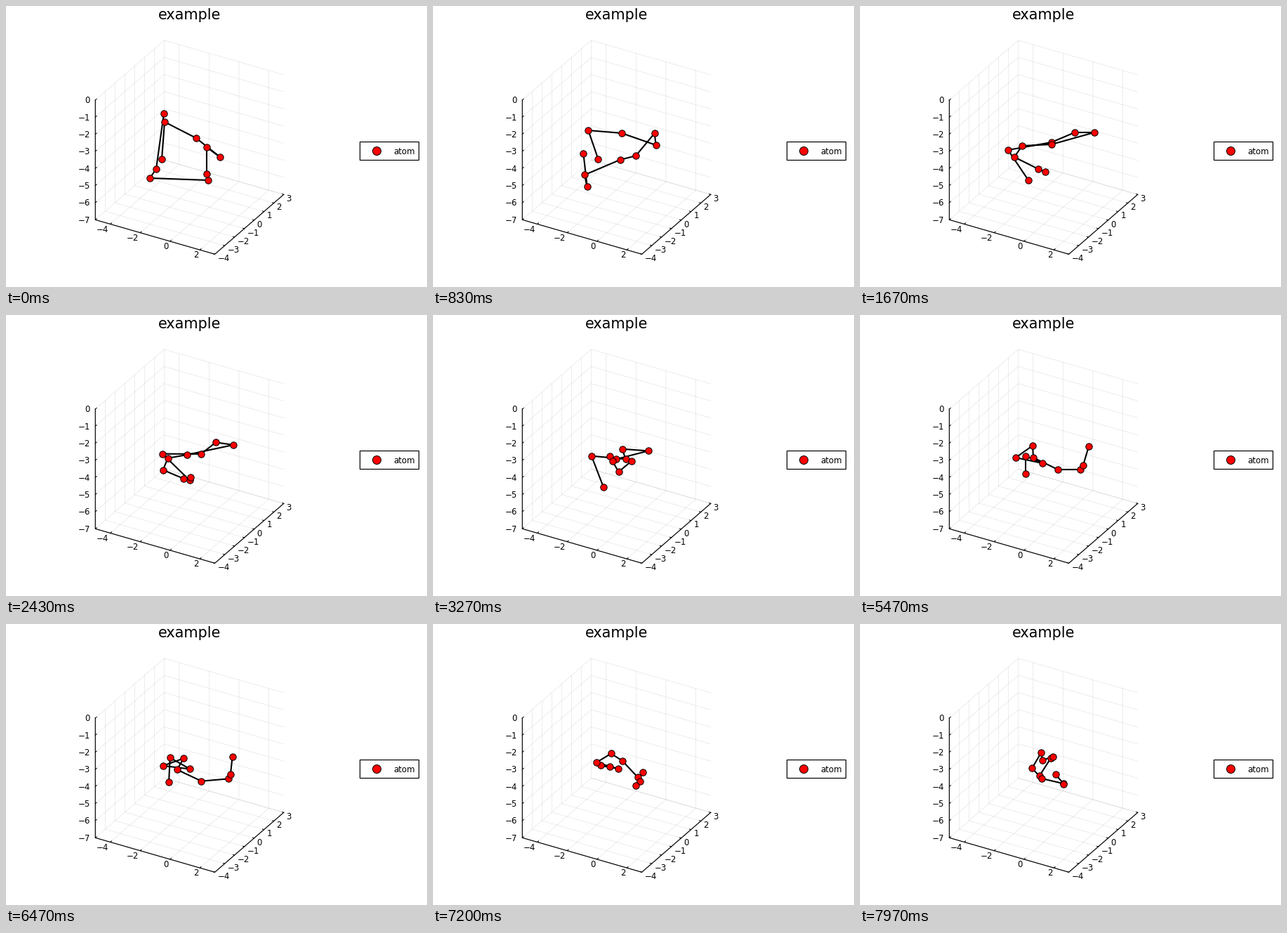
Recreate the animation shown at these times as a matplotlib script. Size 600x400 px, loop 8 s.

```python
import numpy as np
import matplotlib.pyplot as plt
from matplotlib.animation import FuncAnimation
from matplotlib.patches import Rectangle

W, H, DPI = 600, 400, 100
LOOP, FRAMES = 8.0, 240
ATOMS = 10
PX = 72 / DPI

fig = plt.figure(figsize=(W / DPI, H / DPI), dpi=DPI, facecolor="white")
ax = fig.add_axes([0, 0, 1, 1])
ax.set_xlim(0, W)
ax.set_ylim(H, 0)
ax.axis("off")

# Screen projection of the 3D box: x in -5..3, y in -4..3, z in -7..0
ORIGIN = np.array([127.3, 304.3])
EX = np.array([170.3, 49.0]) / 8
EY = np.array([98.2, -85.0]) / 7
EZ = np.array([0, -170.4]) / 7


def project(x, y, z):
    return ORIGIN + (x + 5) * EX + (y + 4) * EY + (z + 7) * EZ


def stroke(points, color="black", width=1.2, **kw):
    xs, ys = np.array(points).T
    return ax.plot(xs, ys, color=color, lw=width * PX, **kw)[0]


def balls(points, size):
    xs, ys = np.array(points).T
    return ax.plot(xs, ys, "o", ms=size * PX, mfc="red", mec="black",
                   mew=PX, zorder=6)[0]


def label(x, y, text, size=11.8, ha="left"):
    text = str(text).replace("-", "\u2212")
    ax.text(x, y, text, fontsize=size * PX, ha=ha, va="baseline",
            family="DejaVu Sans")


def draw_box():
    grid = dict(color=(0, 0, 0, 0.1), width=0.7)
    x_ticks, y_ticks, z_ticks = range(-4, 3, 2), range(-4, 4), range(-7, 1)

    for x in x_ticks:
        stroke([project(x, -4, -7), project(x, 3, -7), project(x, 3, 0)], **grid)
        p = project(x, -4, -7)
        stroke([p, p + 0.13 * EY], width=1)
        label(p[0] - 2, p[1] + 11.3, x, ha="right")
    for y in y_ticks:
        stroke([project(3, y, -7), project(-5, y, -7), project(-5, y, 0)], **grid)
        p = project(3, y, -7)
        stroke([p, p - 0.1 * EX], width=1)
        label(p[0] + 3.8, p[1] + 9.8, y)
    for z in z_ticks:
        stroke([project(-5, -4, z), project(-5, 3, z), project(3, 3, z)], **grid)
        p = project(-5, -4, z)
        stroke([p, p + 0.13 * EY], width=1)
        label(p[0] - 7.2, p[1] + 4.3, z, ha="right")

    stroke([project(-5, -4, 0), project(-5, -4, -7),
            project(3, -4, -7), project(3, 3, -7)])


def draw_legend():
    ax.add_patch(Rectangle((503.6, 192.6), 84, 26, fc="white", ec="black",
                           lw=1.2 * PX))
    balls([(528, 205.8)], 12)
    label(552.2, 210.6, "atom")


# The chain starts wide, swings out flat, then folds into a hook
WIDE = [(222, 218), (226, 165), (271, 188), (305, 215), (286, 201),
        (286, 239), (288, 248), (205, 245), (214, 232), (225, 153)]
FLAT = [(240, 248), (211, 205), (273, 194), (306, 180), (334, 180),
        (273, 197), (231, 199), (220, 215), (254, 232), (264, 236)]
HOOK = [(236, 226), (236, 201), (260, 211), (222, 203), (246, 186),
        (247, 203), (282, 220), (314, 220), (318, 214), (326, 187)]
CENTRE = np.array([268, 206])
SHRUNK = CENTRE + 0.3 * (np.array(HOOK) - CENTRE)

POSES = np.array([WIDE, FLAT, HOOK, SHRUNK])
TIMES = np.array([0, 1.667, 5.467, 10.5])

# Thermal shaking: normal modes of a chain of equal springs
rng = np.random.default_rng(4)
MODE = np.arange(1, ATOMS)
STIFF = np.sin(np.pi * MODE / (2 * ATOMS))
SHAPE = np.cos(np.pi * np.outer(np.arange(ATOMS) + 0.5, MODE) / ATOMS)
PHASE = rng.uniform(0, 2 * np.pi, (2, len(MODE)))
SHAKE = np.array([3.4, 2.6])


def shaking(t):
    swing = np.sin(6.3 * STIFF * t + PHASE) / STIFF
    return SHAPE @ swing.T * SHAKE


def chain(t):
    k = np.searchsorted(TIMES, t, side="right") - 1
    u = (t - TIMES[k]) / (TIMES[k + 1] - TIMES[k])
    ease = u * u * (3 - 2 * u)
    pose = POSES[k] + ease * (POSES[k + 1] - POSES[k])
    return pose + np.sin(np.pi * u) * shaking(t)


draw_box()
draw_legend()
label(261.5, 18.6, "example", size=20.8, ha="center")

bonds = stroke(WIDE, width=2.1, zorder=5, solid_joinstyle="round")
atoms = balls(WIDE, 9.4)


def update(i):
    xs, ys = chain(i * LOOP / FRAMES).T
    bonds.set_data(xs, ys)
    atoms.set_data(xs, ys)
    return bonds, atoms


def reset():
    return update(0)


anim = FuncAnimation(fig, update, frames=FRAMES, init_func=reset,
                     interval=1000 * LOOP / FRAMES, blit=True,
                     repeat=True, repeat_delay=0)
plt.show()
```
